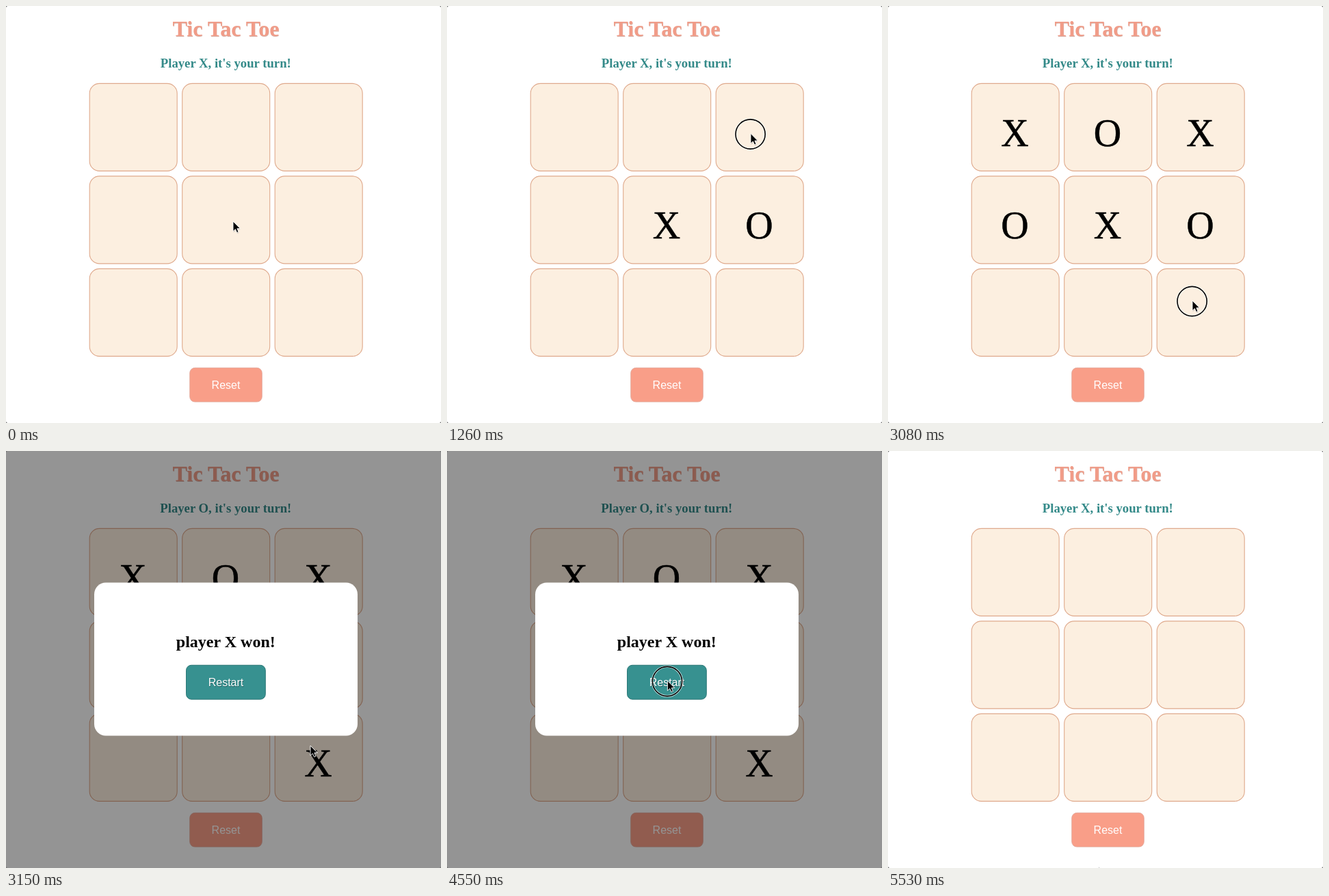
An HTML page for the animation above (5600 ms loop, 636 px wide and 610 px high).

```html
<!DOCTYPE html>
<html lang="en">
<head>
<meta charset="utf-8">
<title>Tic Tac Toe</title>
<style>
  html, body { margin: 0; width: 100%; height: 100%; overflow: hidden; background: #fff; }
  svg { display: block; width: 636px; height: 610px; }
  text { text-anchor: middle; font-family: "Liberation Serif", "Times New Roman", serif; }
  .head { font-weight: bold; font-size: 32px; }
  .status { font-weight: bold; font-size: 18.72px; fill: #348a89; }
  .won { font-weight: bold; font-size: 24px; }
  .label { font-family: "Liberation Sans", Arial, sans-serif; font-size: 16px; fill: #fff; }
  .cell { fill: #fcefe0; stroke: #dfa98c; stroke-width: 1.1; }
  .mark { font-size: 56px; fill: #000; stroke: #000; stroke-width: .5; }
</style>
</head>
<body>
<svg viewBox="0 0 636 610">
  <rect width="636" height="610" fill="#fff"/>
  <text class="head" x="322" y="44.6" fill="#d8b5ac">Tic Tac Toe</text>
  <text class="head" x="321.5" y="44" fill="#f19c88">Tic Tac Toe</text>
  <text class="status" id="status" x="321.3" y="90"></text>
  <g id="board"></g>
  <rect x="268.7" y="529.3" width="105.6" height="49.8" rx="7.5" fill="#f99e88" stroke="#e0a597" stroke-width=".8"/>
  <text class="label" x="321.5" y="560">Reset</text>
  <g id="dialog">
    <rect width="636" height="610" fill="#000" opacity=".42"/>
    <rect x="129" y="192.5" width="385" height="224" rx="17" fill="#fff"/>
    <text class="won" x="321.3" y="287">player X won!</text>
    <rect x="263.5" y="313.3" width="115.8" height="49.9" rx="7.5" fill="#379190" stroke="#2d7877"/>
    <text class="label" x="322" y="344.7" style="fill:#1f5b5b">Restart</text>
    <text class="label" x="321.5" y="344">Restart</text>
  </g>
  <path d="M0 0h2l-2 2zM636 0v2l-2-2zM0 610v-2l2 2zM636 610h-2l2-2z" fill="#777"/>
  <g id="pointer">
    <g id="ring" fill="none">
      <circle cx="-.4" cy="1" r="21.6" stroke="#fff" stroke-opacity=".65" stroke-width="3.4"/>
      <circle cx="-.4" cy="1" r="21.6" stroke="#000" stroke-width="1.6"/>
    </g>
    <path d="M.6 2.2V16.2L4 13.2 6.2 18 8.6 17 6.5 12.2H10.6Z" fill="#000" opacity=".15"/>
    <path d="M0 0V14.6L3.4 11.5 5.6 16.5 8 15.5 5.9 10.6H10.4Z" fill="#000" stroke="#fff" stroke-width=".9"/>
  </g>
</svg>
<script>
const LOOP = 5600, STEP = 70;
const PITCH = 135.5, LEFT = 122.2, TOP = 113.4, SIZE = 128;
const WIN = 3150, RESTART = 4620, PRESS = 140;

// [time, cell] of each turn; X starts
const turns = [[350, 4], [1050, 5], [1400, 2], [1750, 1], [2310, 0], [2660, 3], [WIN, 8]];
const clicks = [...turns.map(turn => turn[0]), RESTART];

// [start, end, x, y] of each pointer move
const moves = [
  [0, 0, 332, 315],
  [490, 910, 439, 319],
  [1050, 1260, 444, 186.5],
  [1400, 1610, 318, 190],
  [1750, 2070, 172, 215],
  [2100, 2170, 170.5, 212],
  [2310, 2520, 172, 332],
  [2660, 3010, 445, 431],
  [3220, 4410, 322.4, 336],
  [5040, 5530, 308, 608.6]
];

const $ = id => document.getElementById(id);
const show = (el, on) => el.setAttribute("visibility", on ? "visible" : "hidden");

function add(tag, attrs) {
  const el = document.createElementNS("http://www.w3.org/2000/svg", tag);
  for (const key in attrs) el.setAttribute(key, attrs[key]);
  return $("board").appendChild(el);
}

const marks = Array.from({ length: 9 }, (_, i) => {
  const x = LEFT + PITCH * (i % 3), y = TOP + PITCH * Math.floor(i / 3);
  add("rect", { class: "cell", x, y, width: SIZE, height: SIZE, rx: 14.5 });
  return add("text", { class: "mark", x: x + SIZE / 2 - .7, y: y + 91.3 });
});

function pointerAt(t) {
  let [, , x, y] = moves[0];
  for (const [start, end, toX, toY] of moves.slice(1)) {
    if (t <= start) break;
    const u = Math.min(1, (t - start) / (end - start));
    const s = u * u * (3 - 2 * u);
    x += (toX - x) * s;
    y += (toY - y) * s;
  }
  return [x, y];
}

function draw(time) {
  const t = Math.floor((time % LOOP) / STEP) * STEP;
  const played = t < RESTART ? turns.filter(turn => turn[0] <= t) : [];
  const player = n => n % 2 ? "O" : "X";

  marks.forEach((mark, i) => {
    const n = played.findIndex(turn => turn[1] === i);
    mark.textContent = n < 0 ? "" : player(n);
  });
  $("status").textContent = `Player ${player(played.length)}, it's your turn!`;
  show($("dialog"), t >= WIN && t < RESTART);
  show($("ring"), clicks.some(c => t >= c - PRESS && t < c));
  $("pointer").setAttribute("transform", `translate(${pointerAt(t)})`);
}

const begin = performance.now();
function tick() {
  draw(performance.now() - begin);
  requestAnimationFrame(tick);
}
tick();
</script>
</body>
</html>
```
